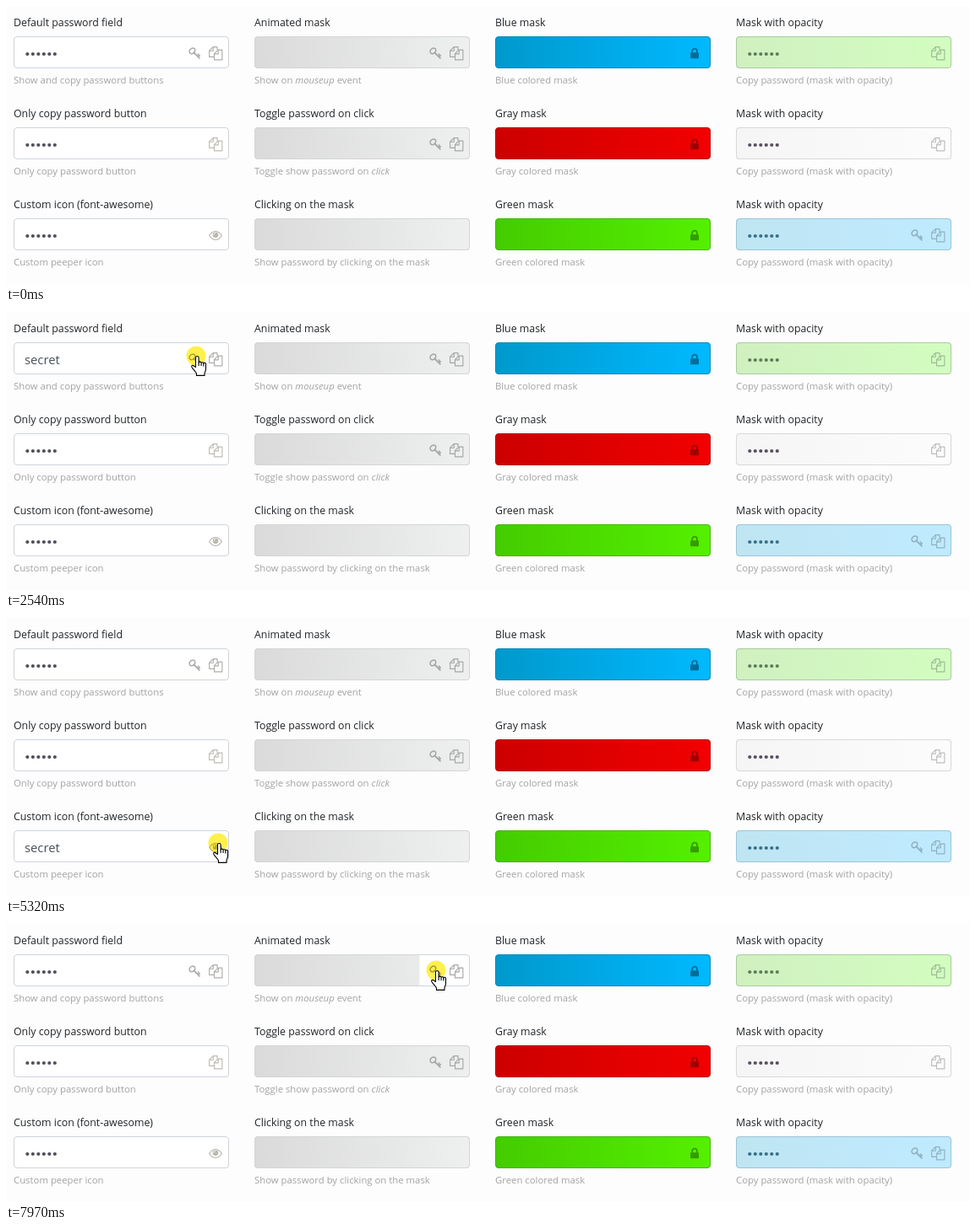
An HTML page for the animation above (8000 ms loop, 1141 px wide and 330 px high).

```html
<!DOCTYPE html>
<html lang="en">
<head>
<meta charset="utf-8">
<title>Password fields</title>
<style>
  html, body { margin: 0; width: 100%; height: 100%; overflow: hidden; background: #fdfdfd; }
  svg { display: block; width: 100vw; height: 100vh; }
  text { font-family: "Open Sans", "Noto Sans", sans-serif; }
  .label { font-size: 12.35px; fill: #212529; }
  .hint { font-size: 11.35px; fill: #a3a3a3; }
  .plain { font-size: 14.8px; fill: #495057; }
  .glow { fill: #fff04c; mix-blend-mode: multiply; }
  .pointer path { fill: #fff; stroke: #000; stroke-width: 1.1; stroke-linejoin: round; }
</style>
</head>
<body>
<svg id="stage" viewBox="0 0 1141 330"></svg>
<script>
const LOOP = 8000;
const stage = document.getElementById('stage');

// Mask colours: left, right, border
const MASKS = {
  silver: ['#dadada', '#eeefef', '#d3d5d6'],
  blue: ['#0099cc', '#00b9ff', '#0088b8'],
  red: ['#cc0000', '#f20000', '#b80000'],
  green: ['#44cc00', '#55f000', '#3db800'],
  mint: ['#d0f0c0', '#d3fdc0', '#a9cba0'],
  pearl: ['#f5f5f5', '#fcfcfc', '#d8d8d8'],
  sky: ['#bfe5f2', '#bfeaff', '#9bc5d5']
};

// Label, hint, icons, icon colour, mask, dot colour; row by row
const FIELDS = [
  ['Default password field', 'Show and copy password buttons', 'key copy', '#adadab', '', '#50505a'],
  ['Animated mask', 'Show on <tspan font-style="italic">mouseup</tspan> event', 'key copy', '#a6a6a6', 'silver'],
  ['Blue mask', 'Blue colored mask', 'lock', '#006d99', 'blue'],
  ['Mask with opacity', 'Copy password (mask with opacity)', 'copy', '#9fbb96', 'mint', '#5c7d58'],
  ['Only copy password button', 'Only copy password button', 'copy', '#bebbb2', '', '#50505a'],
  ['Toggle password on click', 'Toggle show password on <tspan font-style="italic">click</tspan>', 'key copy', '#a6a6a6', 'silver'],
  ['Gray mask', 'Gray colored mask', 'lock', '#a00000', 'red'],
  ['Mask with opacity', 'Copy password (mask with opacity)', 'copy', '#bdbdbd', 'pearl', '#594f60'],
  ['Custom icon (font-awesome)', 'Custom peeper icon', 'eye', '#b9b7ae', '', '#50505a'],
  ['Clicking on the mask', 'Show password by clicking on the mask', '', '', 'silver'],
  ['Green mask', 'Green colored mask', 'lock', '#349d00', 'green'],
  ['Mask with opacity', 'Copy password (mask with opacity)', 'key copy', '#8fb2c0', 'sky', '#386f89']
];

// Icons placed relative to the field's top left corner
const ICONS = {
  key: c => `<g transform="translate(206.3 12.2)" fill="none" stroke="${c}">
    <ellipse cx="5.1" cy="5.1" rx="3.7" ry="2.9" transform="rotate(-45 5.1 5.1)" stroke-width="1.6"/>
    <path d="M7.3 7.3l6.3 6.3" stroke-width="1.8" stroke-linecap="round"/>
    <path d="M11.6 11.3l1.6-1.6M11.6 8.4l2.8 2.8" stroke-width="1.4"/></g>`,
  copy: c => `<path transform="translate(231 12) scale(1.03)" fill="none" stroke="${c}" stroke-width="1.1"
    stroke-linejoin="round" d="M9.7 4V.6H5L.6 5v7h5.7M5.1.6v4.5H.6M15.4 4v11.4H6.3V8.3L10.6 4zM10.9 4v4.6H6.3"/>`,
  lock: c => `<g transform="translate(231 14)"><rect y="5.3" width="10" height="7" rx="1" fill="${c}"/>
    <path d="M2.1 6V3.6a2.9 2.9 0 0 1 5.8 0V6" fill="none" stroke="${c}" stroke-width="1.7"/></g>`,
  eye: c => `<g transform="translate(239 20.5)"><path d="M-7.4 0Q-4.1-5 0-5T7.4 0Q4.1 5 0 5T-7.4 0z"
    fill="none" stroke="${c}" stroke-width="1.2"/><circle cy="-.8" r="3.3" fill="${c}"/>
    <path d="M-1.9-.8A1.9 1.9 0 0 1 0-2.7" fill="none" stroke="#fff" stroke-width=".8"/></g>`
};

const box = (fill, stroke) =>
  `<rect x=".5" y=".5" width="254" height="37" rx="3.5" fill="${fill}" stroke="${stroke}"/>`;

function dots(color) {
  let s = '';
  for (let i = 0; i < 6; i++) s += `<circle cx="${16.3 + 6.5 * i}" cy="21" r="2.1"/>`;
  return `<g fill="${color}">${s}</g>`;
}

function field([label, hint, icons, tint, mask, dot], i) {
  const x = 9 + 285 * (i % 4), y = 36 + 108 * Math.floor(i / 4);
  const clip = i === 1 ? ' clip-path="url(#peel)"' : '';
  return `<g id="field${i}" transform="translate(${x} ${y})">
    <text class="label" y="-12">${label}</text>
    ${box('#fff', '#ced4da')}
    ${mask ? `<g${clip}>${box(`url(#${mask})`, MASKS[mask][2])}</g>` : ''}
    ${dot ? `<g class="dots">${dots(dot)}</g><text class="plain" x="13" y="26">secret</text>` : ''}
    ${icons.split(' ').filter(Boolean).map(n => ICONS[n](tint)).join('')}
    <text class="hint" y="56">${hint}</text></g>`;
}

const gradients = Object.entries(MASKS).map(([id, [a, b]]) =>
  `<linearGradient id="${id}"><stop stop-color="${a}"/><stop offset="1" stop-color="${b}"/></linearGradient>`).join('');

stage.innerHTML = `<defs>${gradients}
  <clipPath id="peel"><rect id="peelBox" width="255" height="38"/></clipPath></defs>
  ${FIELDS.map(field).join('')}
  <circle id="glow" class="glow" r="11.5"/>
  <g id="pointer" class="pointer">
    <path id="arrow" d="M.5.5v16.2l3.8-3.6 2.4 5.6 2.4-1-2.4-5.5h5.2z"/>
    <g id="hand" transform="translate(-6 0)">
      <path d="M5.5 13.5V2.3a1.8 1.8 0 0 1 3.6 0V8a1.6 1.6 0 0 1 3 .3 1.6 1.6 0 0 1 2.8.7 1.4 1.4 0 0 1 2.6 1V16c0 2-1.5 3.2-1.5 5v2.4H6.5V21C5.5 18.5 2.2 15.8.9 13.4c-.8-1.8 1-2.6 2.2-1.6z"/>
      <path d="M9.1 8v4M12.1 8.5v3.5M14.9 9v3.5"/>
    </g>
  </g>`;

const $ = id => document.getElementById(id);
const show = (el, on) => el.setAttribute('visibility', on ? 'visible' : 'hidden');
const within = (t, spans) => spans.some(([a, b]) => t >= a && t < b);

// Pointer moves: first step, last step, step count, Bezier points
const MOVES = [
  [120, 890, 11, [[960, 318], [560, 200], [225, 52]]],
  [3470, 4080, 9, [[225, 52], [238, 105], [251, 162]]],
  [4480, 5240, 11, [[251, 162], [272, 205], [222, 285], [251, 267]]],
  [6790, 7020, 4, [[251, 267], [390, 130], [536, 3]]],
  [7190, 7730, 8, [[536, 3], [544, 28], [509, 55]]]
];
const HOT = [[224, 56], [248, 56], [248, 164], [248, 272], [508, 56]];
const FIRST = [[1210, 1910], [2540, 3240]];
const THIRD = [[5320, 6100], [6410, 6790]];
const CLICKS = [...FIRST, [4160, 4310], ...THIRD, [7880, LOOP]];

const ease = p => p * p * (3 - 2 * p);

function bezier(pts, p) {
  while (pts.length > 1)
    pts = pts.slice(1).map((b, i) => b.map((v, k) => pts[i][k] + (v - pts[i][k]) * p));
  return pts[0];
}

function pointerAt(t) {
  const i = MOVES.findLastIndex(m => t >= m[0]);
  if (i < 0) return null;
  const [a, b, n, pts] = MOVES[i];
  const step = Math.min(n - 1, Math.floor((t - a) / (b - a) * (n - 1) + 1e-6));
  return bezier(pts, ease(i ? (step + 1) / n : step / (n - 1)));
}

function reveal(id, on) {
  show($(id).querySelector('.plain'), on);
  show($(id).querySelector('.dots'), !on);
}
FIELDS.forEach((f, i) => f[5] && reveal('field' + i, false));

function draw(t) {
  reveal('field0', within(t, FIRST));
  reveal('field8', within(t, THIRD));
  $('peelBox').setAttribute('width', t < 7880 ? 255 : t < 7970 ? 241 : 195.5);

  const pos = pointerAt(t);
  show($('glow'), pos && within(t, CLICKS));
  show($('arrow'), false);
  show($('hand'), false);
  if (!pos) return;
  const [x, y] = pos;
  const over = HOT.some(([hx, hy]) => Math.max(Math.abs(x - hx), Math.abs(y - hy)) < 11);
  show($(over ? 'hand' : 'arrow'), true);
  const place = `translate(${Math.round(x)} ${Math.round(y)})`;
  $('pointer').setAttribute('transform', place);
  $('glow').setAttribute('transform', place);
}

const start = performance.now();
function tick() {
  draw((performance.now() - start) % LOOP);
  requestAnimationFrame(tick);
}
tick();
</script>
</body>
</html>
```
